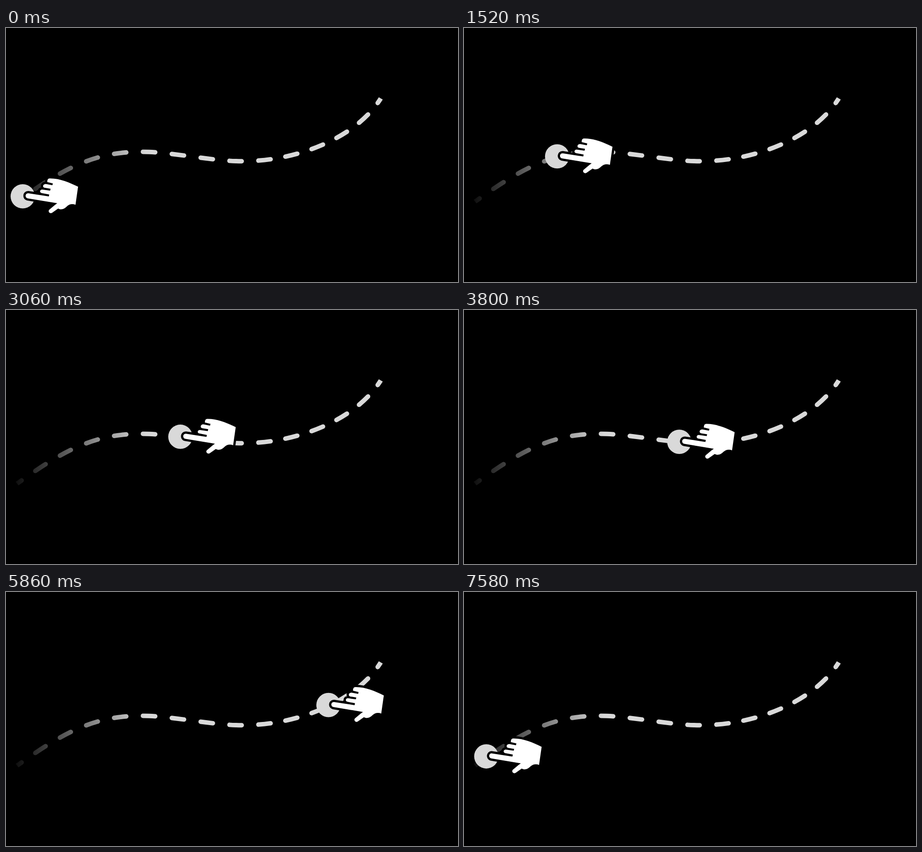
Write an HTML page that moves like this. It is 998 by 561 pixels and loops after 7600 ms.

```html
<!DOCTYPE html>
<html lang="en">
<head>
<meta charset="utf-8">
<title>Drag along a path</title>
<style>
  html, body { margin: 0; width: 100%; height: 100%; overflow: hidden; background: #000; }
  svg { display: block; width: 100vw; height: 100vh; }
</style>
</head>
<body>
<svg viewBox="0 0 998 561">
  <defs>
    <linearGradient id="fade" gradientUnits="userSpaceOnUse" x1="22" y1="0" x2="310" y2="0">
      <stop offset="0" stop-color="#0f0f0f"/>
      <stop offset="1" stop-color="#d9d9d9"/>
    </linearGradient>
  </defs>
  <path id="track" fill="none" stroke="url(#fade)" stroke-width="10" stroke-linecap="round"
    stroke-dashoffset="14.9" d="M24.5 383.5
    C136.5 302.5 206 269.9 316 273.7
    C366 275.5 457 292.8 507 294
    C637 298.5 772.5 243.5 827.5 155.5"/>
  <!-- Square off both ends of the track -->
  <path stroke="#000" stroke-width="14" d="M24.5 383.5l-8 6M827.5 155.5l5-8.5"/>
  <g id="pointer">
    <circle r="26.8" fill="#d9d9d9"/>
    <path transform="translate(-36.8 -371.5)" fill="#fff" stroke="#000" stroke-width="10"
      stroke-linejoin="round" paint-order="stroke" d="
      M49 364.8L94.5 371.8L95.3 367.5L78 364.2C74 363 74 357 79.5 356.5
      L97.3 359L98.3 354.8L84.5 352.6C80 351 81 344.5 87.5 344.2
      L102.3 347L103.3 343L91 340C91 336 92 332.3 96 332
      C118 331.5 140 341 159 350.3L153.3 390.3
      C146 387.5 139 389 134 394C129 399 122 402.5 115 398.5
      L101.5 408C97 411 91.5 405 95.5 401L108 390.5L113 386.8
      L47.5 376C41 374.5 42 364.5 49 364.8Z"/>
  </g>
</svg>
<script>
const LOOP = 7600;
const STEP = 9.1;   // distance moved at each change
const OFFSET = { x: -2.7, y: -1 };

const track = document.getElementById("track");
const pointer = document.getElementById("pointer");

// The gaps get narrower on the final climb
track.setAttribute("stroke-dasharray", "27 37 ".repeat(9) + "27 33.2 ".repeat(6));

// Time in ms, distance along the track
const keys = [
  [0, 18.6], [1520, 210], [3060, 390.7], [4500, 572.8], [5860, 725],
  [6840, 847], [7300, track.getTotalLength()],
  [7300, 0], [7580, 33.6]
];

function distanceAt(t) {
  const i = keys.findLastIndex(([time]) => time <= t);
  const [t0, d0] = keys[i];
  if (i === keys.length - 1) return d0;
  const [t1, d1] = keys[i + 1];
  const count = Math.round((d1 - d0) / STEP);
  return d0 + (d1 - d0) * Math.floor((t - t0) / (t1 - t0) * count) / count;
}

const began = performance.now();

function draw() {
  const t = (performance.now() - began) % LOOP;
  const { x, y } = track.getPointAtLength(distanceAt(t));
  pointer.setAttribute("transform", `translate(${x + OFFSET.x} ${y + OFFSET.y})`);
  requestAnimationFrame(draw);
}
draw();
</script>
</body>
</html>
```
